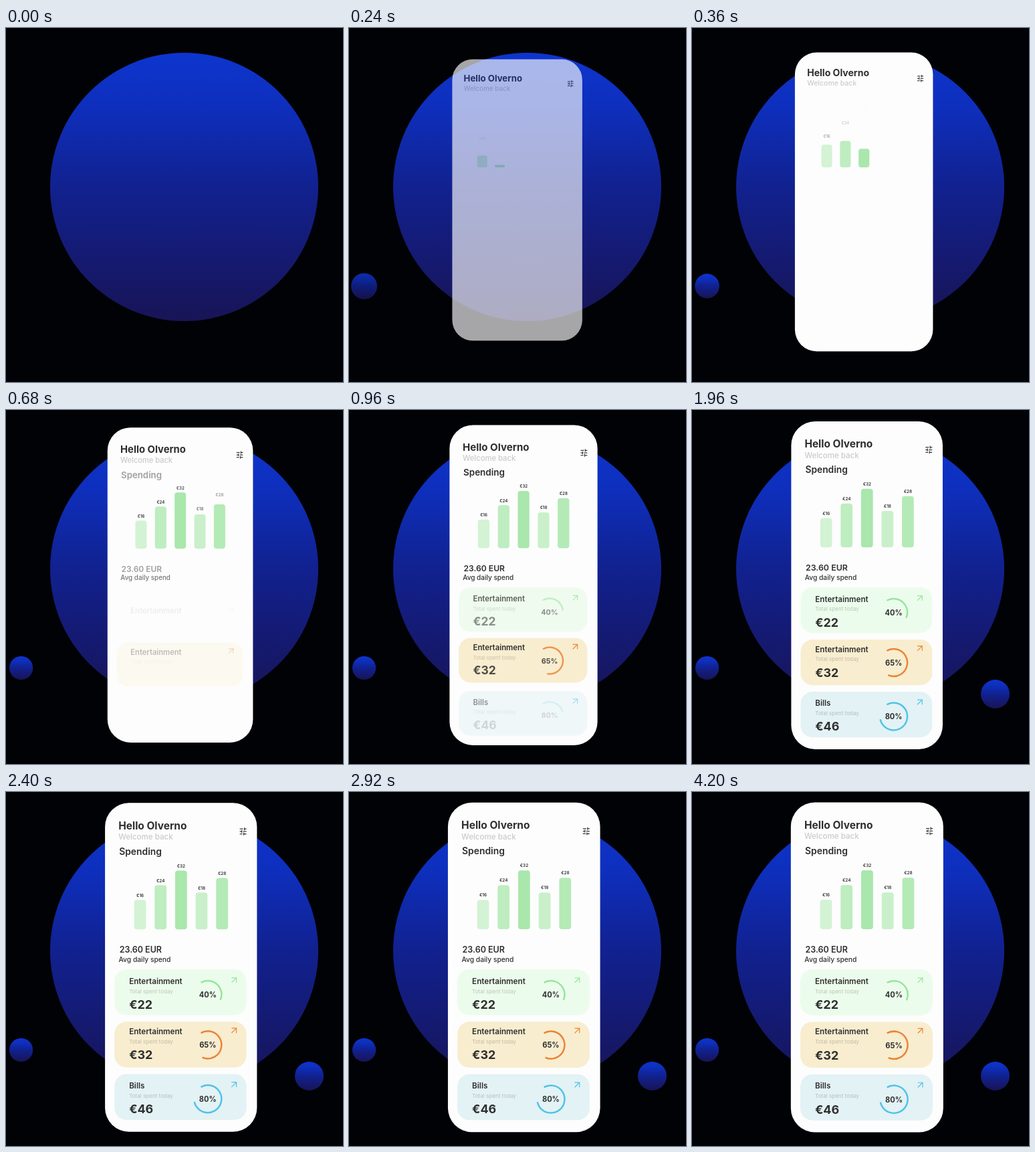
An HTML page with a canvas that plays this animation: 504 by 529 pixels, repeating every 4360 ms.

```html
<!DOCTYPE html>
<html lang="en">
<head>
<meta charset="utf-8">
<title>Spending</title>
<style>
html, body { margin: 0; width: 100%; height: 100%; overflow: hidden; background: #010206; }
canvas { position: absolute; left: 0; top: 0; width: 504px; height: 529px; }
</style>
</head>
<body>
<canvas id="back"></canvas>
<canvas id="phone"></canvas>
<script>
const W = 504, H = 529, LOOP = 4360, STEP = 40;
const MID = 262;
const FONT = 'Inter, "Open Sans", sans-serif';
const INK = '#2e2e2e';
const dpr = window.devicePixelRatio || 1;

function setup(id) {
  const el = document.getElementById(id);
  el.width = W * dpr;
  el.height = H * dpr;
  return el.getContext('2d');
}
const back = setup('back');
const g = setup('phone');

const ramp = (t, start, dur) => Math.max(0, Math.min(1, (t - start) / dur));
const easeOut = x => 1 - Math.pow(1 - x, 3);

const BARS = [
  { level: 4, label: '€16' },
  { level: 6, label: '€24' },
  { level: 8, label: '€32' },
  { level: 5, label: '€18' },
  { level: 7, label: '€28' }
];

// line: baseline of the card's title; the other parts hang from it
const CARDS = [
  { name: 'Entertainment', sum: '€22', pct: 40, fill: '#ecfcec', tint: '#95e69c', line: 287, start: 650 },
  { name: 'Entertainment', sum: '€32', pct: 65, fill: '#f8edcf', tint: '#ec8436', line: 362.5, start: 560 },
  { name: 'Bills', sum: '€46', pct: 80, fill: '#e3f2f4', tint: '#4fc3ea', line: 443.5, start: 760 }
];

function ball(x, y, r, alpha) {
  const fill = back.createLinearGradient(0, y - r, 0, y + r);
  fill.addColorStop(0, '#0d35ce');
  fill.addColorStop(.2, '#0e2fbd');
  fill.addColorStop(.5, '#11218f');
  fill.addColorStop(1, '#181456');
  back.globalAlpha = alpha;
  back.fillStyle = fill;
  back.beginPath();
  back.arc(x, y, r, 0, Math.PI * 2);
  back.fill();
}

function box(x, y, w, h, r, color) {
  r = Math.min(r, h / 2, w / 2);
  g.fillStyle = color;
  g.beginPath();
  g.moveTo(x + r, y);
  g.arcTo(x + w, y, x + w, y + h, r);
  g.arcTo(x + w, y + h, x, y + h, r);
  g.arcTo(x, y + h, x, y, r);
  g.arcTo(x, y, x + w, y, r);
  g.fill();
}

function text(str, x, y, size, weight, color = INK, align = 'left') {
  g.font = `${weight} ${size}px ${FONT}`;
  g.fillStyle = color;
  g.textAlign = align;
  g.fillText(str, x, y);
}

function line(color, width, ...pts) {
  g.strokeStyle = color;
  g.lineWidth = width;
  g.beginPath();
  for (let i = 0; i < pts.length; i += 2) g.lineTo(pts[i], pts[i + 1]);
  g.stroke();
}

function sliders(x, y) {
  [7, 3, 6].forEach((knob, i) => {
    const gap = i === 1 ? knob : knob - 2, ly = y + 3.8 * i;
    line(INK, 1.2, x, ly, x + gap, ly);
    line(INK, 1.2, x + gap + 2, ly, x + 10, ly);
    line(INK, 1.2, x + knob, ly - 2, x + knob, ly + 2);
  });
}

function header() {
  text('Hello Olverno', 168, 55, 15.5, 700);
  text('Welcome back', 168, 70.4, 11.6, 500, '#cbcbcb');
  sliders(350, 54.5);
}

function chart(t) {
  BARS.forEach(({ level, label }, i) => {
    const x = 191.5 + 30.75 * i, full = 11 * level, start = 157 + 73 * i;
    const h = full * easeOut(ramp(t, start, 430));
    const color = `rgb(${253 - 10.5 * level}, ${255 - 3 * level}, ${252 - 10 * level})`;
    g.globalAlpha = 1;
    if (h > 0) box(x, 205 - h, 17.8, h, 4, color);
    g.globalAlpha = ramp(t, start + 50, 360);
    text(label, x + 9, 200.2 - full, 6.4, 600, INK, 'center');
  });
}

function summary(t) {
  const k = ramp(t, 500, 400), dy = 10 * (1 - easeOut(k));
  g.globalAlpha = k;
  text('Spending', 169, 93 + dy, 13.9, 600);
  text('23.60 EUR', 169.5, 240.3 + dy, 12.5, 600);
  g.globalAlpha = ramp(t, 420, 400);
  text('Avg daily spend', 168.3, 254.3, 10.3, 500);
}

function card(c, i, t) {
  const k = ramp(t, c.start, 400);
  if (!k) return;
  g.save();
  g.translate(0, 25 * (1 - easeOut(k)));
  g.globalAlpha = k;
  box(162, 265 + 78.5 * i, 198, 68.7, 18, c.fill);
  text(c.name, 184, c.line, 11.7, 600);

  const ax = 341.3, ay = c.line - 5.6, r = 3.6;
  line(c.tint, 1.2, ax - r, ay + r, ax + r, ay - r);
  line(c.tint, 1.2, ax - r, ay - r, ax + r, ay - r, ax + r, ay + r);

  g.globalAlpha = ramp(t, c.start + 60, 400);
  text('Total spent today', 184, c.line + 13.7, 8.1, 400, 'rgba(50,60,50,.27)');
  g.globalAlpha = ramp(t, c.start + 150, 300);
  text(c.sum, 184, c.line + 37.2, 18, 700);

  const sweep = easeOut(ramp(t, c.start + 140, 420));
  if (sweep) {
    const from = -Math.PI * 2 / 3, cy = c.line + 15.8;
    text(c.pct + '%', 302, cy + 4.3, 11.1, 700, INK, 'center');
    g.strokeStyle = c.tint;
    g.lineWidth = 2.5;
    g.beginPath();
    g.arc(302, cy, 20.6, from, from + Math.PI * 2 * c.pct / 100 * sweep);
    g.stroke();
  }
  g.restore();
}

function scene(t) {
  back.setTransform(dpr, 0, 0, dpr, 0, 0);
  back.globalAlpha = 1;
  back.fillStyle = '#010206';
  back.fillRect(0, 0, W, H);
  ball(266.5, 237.5, 200.5, 1);
  const shrink = Math.pow(1 - ramp(t, 40, 520), 2);
  ball(22.6, 385.5 + shrink, 17.6 + 5 * shrink, ramp(t, 20, 260));
  ball(453.5, 424.5, 21.5, ramp(t, 1100, 560));
}

function phone(t) {
  g.setTransform(dpr, 0, 0, dpr, 0, 0);
  g.clearRect(0, 0, W, H);
  g.canvas.style.opacity = ramp(t, 40, 305);

  // A quick entrance plus a long settle, both shrinking to zero.
  const quick = .193 * (1 - easeOut(ramp(t, 40, 600)));
  const settle = .13 * Math.exp(-t / 650);
  const s = 1 - quick - settle;
  g.translate(MID - 136 * quick - 27 * settle, MID - 72 * quick - 10 * settle);
  g.scale(s, s);
  g.translate(-MID, -MID);

  g.globalAlpha = 1;
  box(147.8, 15.4, 228, 493.2, 36, '#fdfdfd');
  header();
  chart(t);
  summary(t);
  CARDS.forEach((c, i) => card(c, i, t));
}

const begin = performance.now();
function tick() {
  const now = (performance.now() - begin) % LOOP;
  const t = Math.min(4200, Math.floor(now / STEP) * STEP);
  scene(t);
  phone(t);
  requestAnimationFrame(tick);
}
tick();
</script>
</body>
</html>
```
